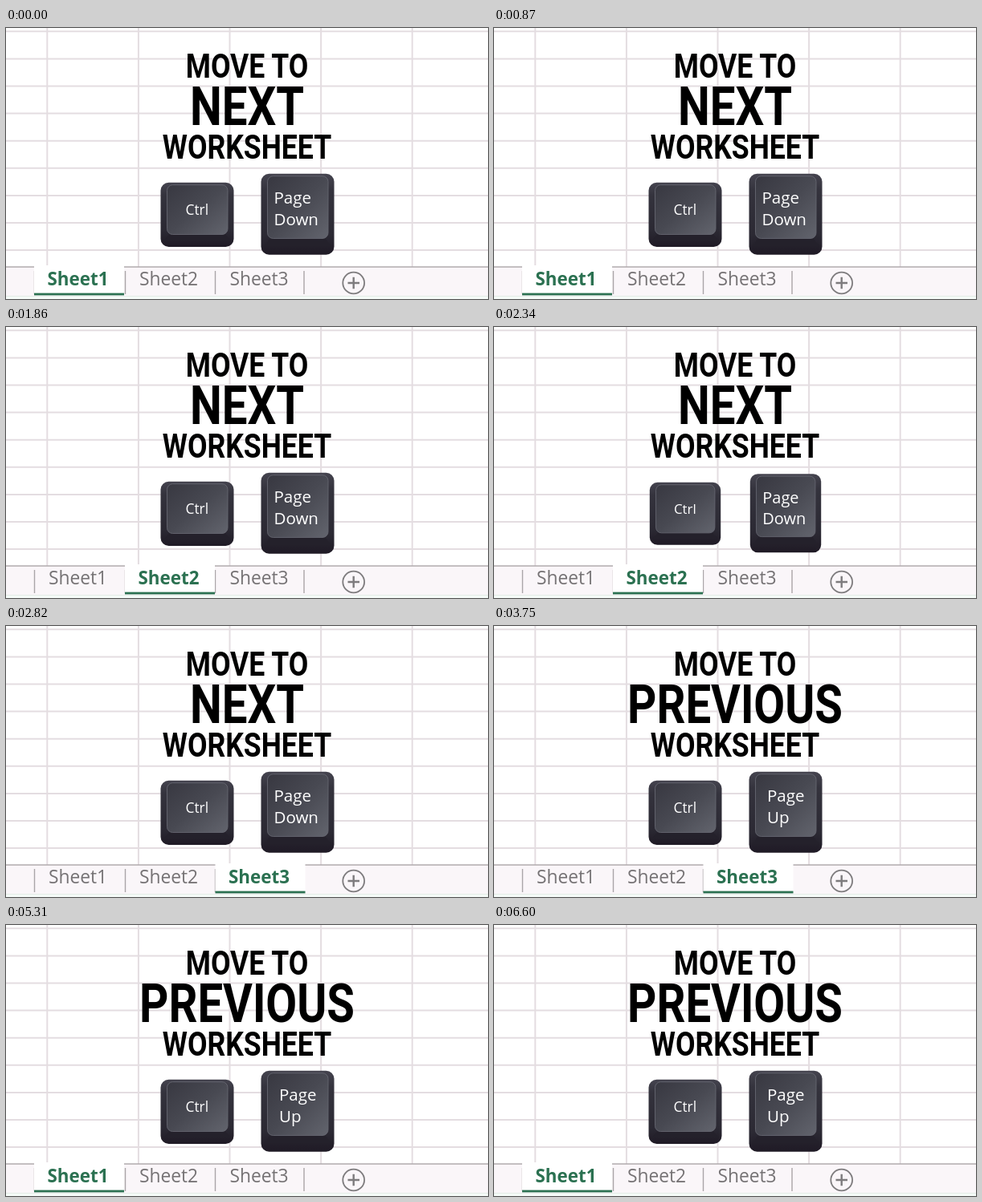
Recreate the animation shown at these times as an HTML page. Size 600 px wide and 338 px high, loop 6.63 s.

```html
<!DOCTYPE html>
<html lang="en">
<head>
<meta charset="utf-8">
<title>Worksheet shortcuts</title>
<style>
  html, body { margin: 0; width: 100%; height: 100%; overflow: hidden; background: #fff; }
  svg { display: block; width: 100%; height: 100%; }
  .title { font: 600 42px Roboto, sans-serif; text-anchor: middle; }
  .title .big { font-size: 66.5px; }
  .title .heavy { font-weight: 700; }
  .cap { font: 500 20.5px "Open Sans", "Noto Sans", sans-serif; fill: #fff; }
  .tab text { font: 500 22.8px "Open Sans", "Noto Sans", sans-serif; fill: #757274; text-anchor: middle; }
  .tab rect { visibility: hidden; }
  .tab.on rect { visibility: visible; }
  .tab.on text { font-size: 22.4px; font-weight: 700; fill: #2b7151; }
</style>
</head>
<body>
<svg viewBox="0 0 600 338">
  <defs>
    <linearGradient id="side" x2="0" y2="1">
      <stop offset="0" stop-color="#45444f"/>
      <stop offset=".2" stop-color="#34333d"/>
      <stop offset=".75" stop-color="#2b2933"/>
      <stop offset="1" stop-color="#1f1a25"/>
    </linearGradient>
    <linearGradient id="face" x1="0" y1="0" x2="1" y2="1">
      <stop offset="0" stop-color="#383841"/>
      <stop offset=".5" stop-color="#484952"/>
      <stop offset="1" stop-color="#62646d"/>
    </linearGradient>
  </defs>
  <rect width="600" height="338" fill="#fff"/>
  <path id="grid" fill="none" stroke="#e4dde1" stroke-width="2"/>
  <g class="title" transform="translate(300 0) scale(.847 1)">
    <text y="62">MOVE TO</text>
    <text y="121.5" class="big" id="word">NEXT</text>
    <text y="163">WORKSHEET</text>
  </g>
  <g id="keys"></g>
  <rect y="298" width="600" height="36" fill="#faf6f9"/>
  <rect y="334" width="600" height="4" fill="#f5fbf8"/>
  <path d="M0 298H600" stroke="#b0abae" stroke-width="1.4"/>
  <path d="M0 334.5H600" stroke="#e4ebe7"/>
  <path d="M35.5 303V332M148.5 303V332M260.5 303V332M371 303V332" stroke="#aaa5a8" stroke-width="1.4"/>
  <g id="tabs"></g>
  <g fill="none" stroke="#7d7b7d" stroke-width="1.8">
    <circle cx="432.7" cy="318" r="13.4"/>
    <path d="M425.5 318H440M432.7 310.8V325.2" stroke-width="2.4"/>
  </g>
</svg>
<script>
const LOOP = 6630, NEXT_END = 3510;
const presses = [1640, 2430, 4330, 5090]; // moment each key press is deepest
const sheetAfter = [0, 1, 2, 1, 0];
const $ = id => document.getElementById(id);

let lines = '';
for (let i = 0; i < 5; i++) lines += `M${51.3 + i * 113.6} 0V298`;
for (let i = 0; i < 9; i++) lines += `M0 ${4.3 + i * 34.1}H600`;
$('grid').setAttribute('d', lines);

const key = (x, y, h, label) => `<g class="key" data-c="${x + 45.5} ${y + h / 2}">
  <rect x="${x}" y="${y}" width="91" height="${h}" rx="10" fill="url(#side)"/>
  <path d="M${x + 4} ${y + h * .9}L${x + 11} ${y + h * .8}H${x + 80}L${x + 87} ${y + h * .9}" fill="#24212b"/>
  <rect x="${x + 8}" y="${y + 3}" width="75.5" height="${h * .77}" rx="7" fill="url(#face)" stroke="#666771" stroke-width=".9"/>
  ${label}</g>`;
$('keys').innerHTML =
  key(192.5, 192.7, 80.3, '<text class="cap" x="223.5" y="233" style="font-size:17.4px">Ctrl</text>') +
  key(317.5, 181.7, 101, '<text class="cap" id="page" y="219.3">Page</text><text class="cap" id="dir" y="246.3"></text>');

$('tabs').innerHTML = [35, 148, 260.5].map((x, i) => `<g class="tab">
  <rect x="${x}" y="296" width="112" height="35" fill="#fff"/>
  <rect x="${x}" y="330.6" width="112" height="2.8" fill="#2b7151"/>
  <text x="${x + 54.5}" y="320.7">Sheet${i + 1}</text></g>`).join('');

const tabs = document.querySelectorAll('.tab');
const keys = document.querySelectorAll('.key');

function draw(t) {
  const next = t < NEXT_END;
  $('word').textContent = next ? 'NEXT' : 'PREVIOUS';
  $('word').classList.toggle('heavy', next);
  $('dir').textContent = next ? 'Down' : 'Up';
  for (const id of ['page', 'dir']) $(id).setAttribute('x', next ? 333.5 : 340);

  const sheet = sheetAfter[presses.filter(p => t >= p).length];
  tabs.forEach((tab, i) => tab.classList.toggle('on', i === sheet));

  const depth = Math.max(...presses.map(p => Math.max(0, 1 - Math.abs(t - p) / 150)));
  const scale = 1 - .07 * depth;
  keys.forEach(k => {
    const c = k.dataset.c, [x, y] = c.split(' ');
    k.setAttribute('transform', `translate(${c}) scale(${scale}) translate(${-x} ${-y})`);
  });
}

const start = performance.now();
function tick() {
  draw((performance.now() - start) % LOOP);
  requestAnimationFrame(tick);
}
tick();
</script>
</body>
</html>
```
